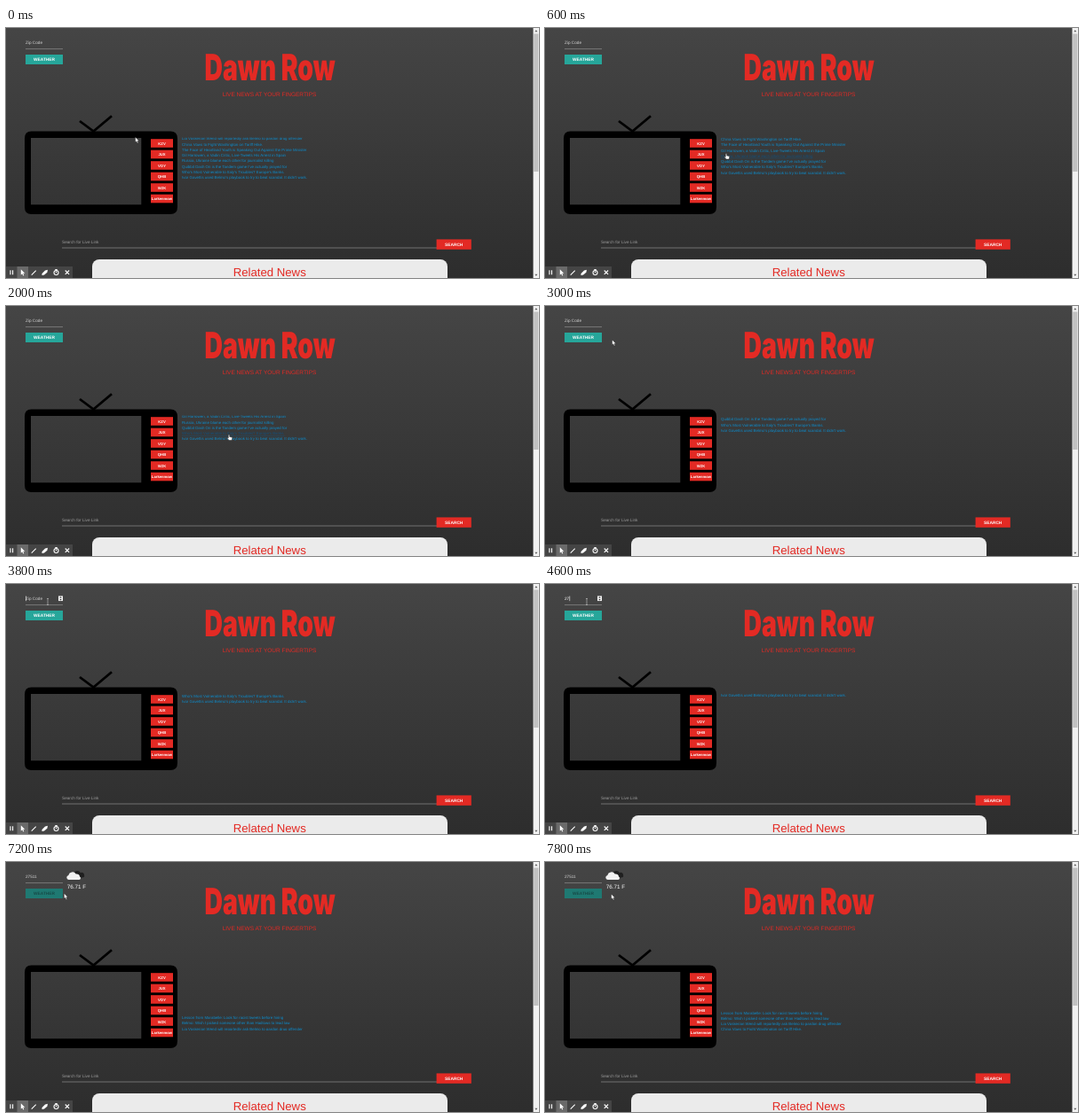
An HTML page that plays this animation: 600x282 px, repeating every 8000 ms.

```html
<!DOCTYPE html>
<html lang="en">
<head>
<meta charset="utf-8">
<title>Dawn Row</title>
<style>
  html, body { margin: 0; width: 100%; height: 100%; overflow: hidden; background: #383838; }
  svg { display: block; width: 600px; height: 282px; }
  text { font-family: "Liberation Sans", Arial, sans-serif; text-rendering: geometricPrecision; }
  .title { font: 900 41px Inter, sans-serif; }
  .red { fill: #e32a24; }
  .mid { text-anchor: middle; }
  .label { font-weight: bold; fill: #fff; text-anchor: middle; }
  .link { font-size: 4.4px; fill: #0c8ccc; }
  .link.hover { fill: #14507a; text-decoration: underline; }
  .rule { stroke: #8e8e8e; stroke-width: .7; }
  .icon { fill: none; stroke: #fff; stroke-width: 1.1; }
</style>
</head>
<body>
<svg viewBox="0 0 600 282">
  <defs>
    <linearGradient id="bg" x2="0" y2="1">
      <stop stop-color="#454545"/>
      <stop offset="1" stop-color="#2d2d2d"/>
    </linearGradient>
    <clipPath id="feedBox"><rect x="197" y="123.5" width="160" height="66.5"/></clipPath>
  </defs>
  <rect width="600" height="282" fill="url(#bg)"/>

  <g transform="translate(297 59.3) scale(.69 1)"><text class="title red mid">Dawn Row</text></g>
  <text class="red mid" x="296.5" y="77.3" font-size="6.5">LIVE NEWS AT YOUR FINGERTIPS</text>

  <!-- zip form -->
  <text id="zip" x="22" y="18" font-size="4.7"></text>
  <path id="caret" d="M0 13.6v5.6" stroke="#fff" stroke-width=".6"/>
  <path class="rule" d="M22 23.6H64"/>
  <g id="spin">
    <rect x="59" y="13.5" width="5" height="5.6" fill="#f4f4f4"/>
    <path d="M60.2 15.7l1.3-1.5 1.3 1.5zM60.2 16.9l1.3 1.5 1.3-1.5z" fill="#333"/>
  </g>
  <rect id="go" x="22" y="30" width="42" height="11"/>
  <text id="goText" class="label" x="43" y="37.3" font-size="4.8">WEATHER</text>

  <g id="weather">
    <path d="M75 17.5a3 3 0 0 1 1-5 4.5 4.5 0 0 1 8-.3 2.7 2.7 0 0 1 4 2.6 2 2 0 0 1-1.5 2.7z" fill="#1f1f1f"/>
    <path d="M70.5 20a2.6 2.6 0 0 1-.2-5.1 4.6 4.6 0 0 1 8.400-1.300 3.300 3.300 0 0 1 4.300 3 1.800 1.800 0 0 1-.5 3.400z" fill="#f2f2f2"/>
    <text x="68.700" y="30.200" font-size="6.300" fill="#fff">76.71 F</text>
  </g>

  <!-- television -->
  <path d="M83 105L98.500 116.500L119 99.300" fill="none" stroke="#000" stroke-width="2.800"/>
  <path fill-rule="evenodd" d="M28.500 116.500H185q8 0 8 8V202q0 8-8 8H28.500q-7.500 0-7.500-8V124.500q0-8 7.500-8zM28 124V199.300H152.300V124z"/>
  <g id="channels"></g>

  <g id="feed" clip-path="url(#feedBox)"></g>

  <!-- search -->
  <text x="63" y="242.500" font-size="4.700" fill="#9c9c9c">Search for Live Link</text>
  <path class="rule" d="M63 248H485"/>
  <rect class="red" x="484.600" y="238.400" width="39.200" height="11.400"/>
  <text class="label" x="504.200" y="245.800" font-size="4.800">SEARCH</text>

  <rect x="97" y="261" width="400" height="40" rx="8" fill="#ebebeb"/>
  <text class="red mid" x="296.700" y="280.300" font-size="13.200">Related News</text>

  <!-- scrollbar -->
  <rect x="593.500" width="6.500" height="282" fill="#f1f1f1"/>
  <rect x="594.200" y="6.500" width="5.200" height="155.500" fill="#c1c1c1"/>
  <path d="M595.300 4.200l1.500-1.900 1.500 1.900zM595.300 277.800l1.500 1.900 1.500-1.900z" fill="#555"/>

  <!-- recorder toolbar -->
  <rect y="269" width="75" height="13" fill="#454545"/>
  <rect x="12.500" y="269" width="12.500" height="13" fill="#6a6a6a"/>
  <path class="icon" d="M5 273.300v5M7.600 273.300v5"/>
  <path d="M16.800 272.300v6.200l1.500-1.300 1 2.200 1-.5-1-2.100h2z" fill="#fff"/>
  <path class="icon" stroke-width="1.600" d="M28.700 278.700l5-5"/>
  <path d="M40.500 277l3.500-3.500 3-.8-.7 3-3.300 2.800-2.500.5z" fill="#fff"/>
  <circle class="icon" cx="56.500" cy="276" r="2.500"/>
  <path class="icon" d="M55.300 272.600h2.400M56.500 274.500v1.700M66.700 273.500l4.400 4.400M71.100 273.500l-4.400 4.400"/>

  <g id="pointer">
    <path id="arrow" d="M0 0v6l1.400-1.200 1 2.300 1.100-.5-1-2.200h1.900z" fill="#fff" stroke="#111" stroke-width=".4"/>
    <path id="hand" d="M-.7.400q.7-.8 1.400 0V2.500l2.400.6q.7.200.6 1L3.200 6.500H0L-2 3.900q.2-.8 1.300.1z" fill="#fff" stroke="#111" stroke-width=".4"/>
    <path id="beam" d="M-1-3.500H1M0-3.500v7M-1 3.500H1" fill="none" stroke="#c8c8c8" stroke-width=".6"/>
  </g>
</svg>
<script>
const LOOP = 8000, STEP = 200;
const PITCH = 6.25, SPEED = 9.4 / 1000, FEED_TOP = 112.3, FEED_GAP = 131;

const channels = ["KZV", "JUX", "VOY", "QHB", "WZK", "Larkenmow"];
const headlines = [
  "Lesson from Marabelle: Look for racist tweets before hiring",
  "Belmo: Wish I picked someone other than Hadlows to lead law",
  "Lia Voskerian Wend will reportedly ask Belmo to pardon drug offender",
  "China Vows to Fight Washington on Tariff Hike.",
  "The Face of Heartland Youth is Speaking Out Against the Prime Minister",
  "Gil Harrowen, a Vadin Critic, Live-Tweets His Arrest in Spain",
  "Russia, Ukraine blame each other for journalist killing",
  "Quibbit Dash On is the Tandem game I've actually prayed for",
  "Who's Most Vulnerable to Italy's Troubles? Europe's Banks.",
  "Ivor Gavettis used Belmo's playbook to try to beat scandal. It didn't work."
];

// pointer stops: time, x, y
const path = [
  [0, 145.5, 123], [200, 150, 126], [1000, 258, 157], [1200, 259, 157],
  [1600, 255, 151], [2000, 251, 145], [2400, 250, 143],
  [3000, 75.5, 38], [3400, 47, 20], [5600, 47, 20],
  [6200, 47, 33], [6800, 47, 34], [7400, 74.5, 36], [LOOP, 74.5, 36]
];
const typed = [[0, ""], [4200, "2"], [4600, "27"], [4800, "275"], [5000, "27511"]];
const FOCUS = 3600, CLICK = 6800, REPORT = 7200;

const $ = id => document.getElementById(id);
const show = (id, on) => $(id).setAttribute("visibility", on ? "visible" : "hidden");

function add(parent, tag, attrs, text = "") {
  const el = document.createElementNS("http://www.w3.org/2000/svg", tag);
  for (const k in attrs) el.setAttribute(k, attrs[k]);
  el.textContent = text;
  return parent.appendChild(el);
}

channels.forEach((name, i) => {
  const y = 130 + i * 12.5;
  add($("channels"), "rect", { class: "red", x: 163, y: y - 4.8, width: 25, height: 9.6 });
  add($("channels"), "text", { class: "label", x: 175.5, y: y + 1.5, "font-size": 4.2 }, name);
});

const links = [0, 1].flatMap(pass => headlines.map((text, i) => ({
  y: FEED_TOP + pass * FEED_GAP + i * PITCH,
  el: add($("feed"), "text", { class: "link", x: 198 }, text)
})));

function pointerAt(t) {
  const i = path.findIndex(p => p[0] > t);
  const [t0, x0, y0] = path[i - 1], [t1, x1, y1] = path[i];
  const k = (t - t0) / (t1 - t0);
  return [x0 + (x1 - x0) * k, y0 + (y1 - y0) * k];
}

const inside = (x, y, l, t, r, b) => x >= l && x <= r && y >= t && y <= b;

function draw(t) {
  const [x, y] = pointerAt(t);
  const inFeed = inside(x, y, 198, 123.5, 339, 190);
  let overLink = false;
  for (const link of links) {
    const mid = link.y - SPEED * t;
    const hover = inFeed && Math.abs(y - mid) < PITCH / 2;
    overLink = overLink || hover;
    link.el.setAttribute("y", mid + 1.6);
    link.el.setAttribute("class", hover ? "link hover" : "link");
  }

  const overGo = inside(x, y, 22, 30, 64, 41);
  const overZip = inside(x, y, 22, 10, 64, 24);
  const kind = overLink || overGo ? "hand" : overZip ? "beam" : "arrow";
  ["arrow", "hand", "beam"].forEach(id => show(id, id === kind));
  $("pointer").setAttribute("transform", `translate(${x} ${y})`);

  const value = typed.filter(s => s[0] <= t).pop()[1];
  const focus = t >= FOCUS && t < CLICK;
  $("zip").textContent = value || "Zip Code";
  $("zip").setAttribute("fill", focus && value ? "#fff" : "#d4d4d4");
  show("caret", focus);
  $("caret").setAttribute("transform", `translate(${22.5 + value.length * 2.62} 0)`);
  show("spin", focus || overZip);

  const pressed = t >= CLICK;
  $("go").setAttribute("fill", pressed ? "#1f7972" : "#26a69a");
  $("goText").style.fill = pressed ? "#174b48" : overGo ? "#a5d9d4" : "#fff";
  show("weather", t >= REPORT);
}

const start = performance.now();
function tick() {
  const t = (performance.now() - start) % LOOP;
  draw(Math.floor(t / STEP) * STEP);
  requestAnimationFrame(tick);
}
tick();
</script>
</body>
</html>
```
